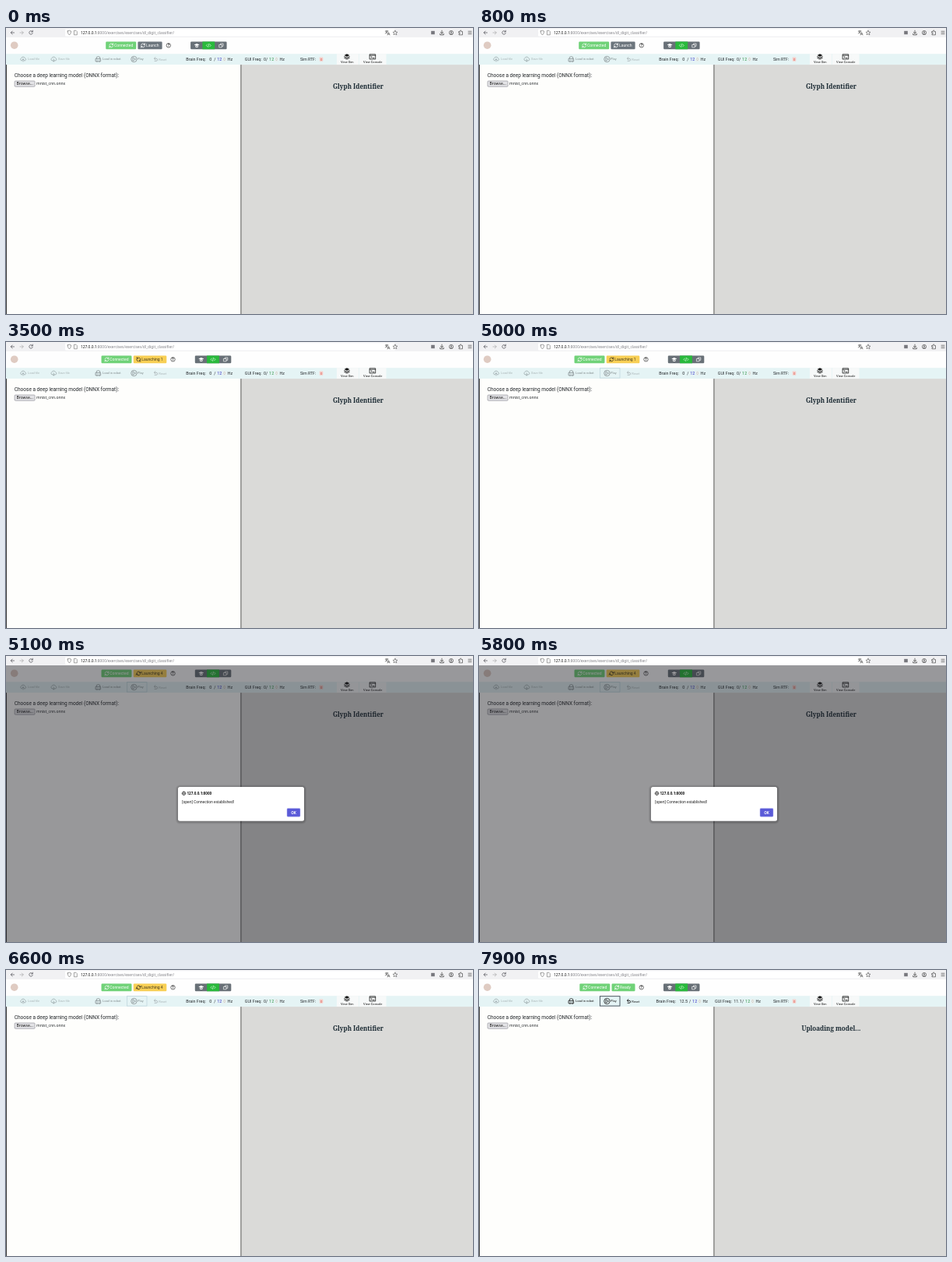
Animation, 600 px wide and 367 px high, one loop 8 s. Source, as an HTML page:

```html
<!DOCTYPE html>
<html lang="en">
<head>
<meta charset="utf-8">
<title>Exercise page</title>
<style>
  html, body { margin: 0; width: 100%; height: 100%; overflow: hidden; background: #fefefc; }
  svg { display: block; width: 100vw; height: 100vh; }
  text { font-family: Roboto, sans-serif; white-space: pre; }
  .ui { font-family: "Noto Sans", sans-serif; }
  .title { font: bold 8px "Noto Serif", serif; }
</style>
</head>
<body>
<svg id="stage" viewBox="0 0 600 367" xmlns="http://www.w3.org/2000/svg"></svg>
<script>
const LOOP = 8000;
const LAUNCH = 1000, ALERT = 5100, PRESS = 6400, CLOSE = 6600, READY = 6900, PLAY = 7200;
const INK = '#25292c', FAINT = '#a9b4b6', BLACK = '#111';
const stage = document.getElementById('stage');

function add(parent, tag, attrs = {}, content) {
  const node = document.createElementNS('http://www.w3.org/2000/svg', tag);
  set(node, attrs);
  if (content !== undefined) node.textContent = content;
  parent.appendChild(node);
  return node;
}
function set(node, attrs) {
  for (const key in attrs) node.setAttribute(key, attrs[key]);
}
const group = (parent, x = 0, y = 0) => add(parent, 'g', { transform: `translate(${x} ${y})` });
const rect = (parent, x, y, width, height, fill, more) =>
  add(parent, 'rect', { x, y, width, height, fill, ...more });
const text = (parent, x, y, size, content, fill = INK, more) =>
  add(parent, 'text', { x, y, 'font-size': size, fill, ...more }, content);
const line = (parent, d, stroke = '#4a4a50', width = 0.7, more) =>
  add(parent, 'path', { d, stroke, 'stroke-width': width, fill: 'none',
    'stroke-linecap': 'round', 'stroke-linejoin': 'round', ...more });
const circle = (parent, cx, cy, r, fill, more) => add(parent, 'circle', { cx, cy, r, fill, ...more });
const show = (node, on) => node.setAttribute('display', on ? 'inline' : 'none');
const move = (node, x, y = 0) => node.setAttribute('transform', `translate(${x} ${y})`);
const SYNC = 'M-2.4-.4A2.5 2.5 0 0 1 2-1.5M2.4-2.6V-1H.8M2.4.4A2.5 2.5 0 0 1-2 1.5M-2.4 2.6V1H-.8';

function drawBrowser() {
  rect(stage, 0, 0, 600, 12, '#f1f1f3');
  rect(stage, 76, 1.2, 424, 9.6, '#fff', { rx: 1.5 });
  line(stage, 'M10.5 6H6.3M8.2 4L6.2 6L8.2 8');
  line(stage, 'M18 6H22.2M20.3 4L22.3 6L20.3 8', '#aaa');
  line(stage, 'M34 4.6A2.3 2.3 0 1 0 34.3 6.6M34.3 3.2V5H32.5');
  line(stage, 'M79.2 4L81.4 3.2L83.6 4Q83.7 7.5 81.4 9Q79.1 7.5 79.2 4Z', '#666', 0.6);
  line(stage, 'M87.8 3.3H90L91.3 4.6V8.8H87.8Z', '#666', 0.6);
  const url = text(stage, 96, 7.8, 4.85, '', BLACK, { class: 'ui' });
  add(url, 'tspan', {}, '127.0.0.1');
  add(url, 'tspan', { fill: '#808086' }, ':8000/exercises/exercises/dl_digit_classifier/');
  line(stage, 'M487.3 4H491M489 3.2V4M490.3 4Q489.8 6.4 487.3 7M488 4.6Q489 6.5 490.3 6.8M490.2 9L491.6 5.6L493 9M490.7 8H492.5', '#444', 0.6);
  line(stage, 'M500 3.2L500.9 5.1L503 5.3L501.4 6.7L501.9 8.8L500 7.7L498.1 8.8L498.6 6.7L497 5.3L499.1 5.1Z', '#444', 0.55);
  rect(stage, 546.2, 3.8, 4.6, 4.4, '#77777d');
  line(stage, 'M560 3.2V7M558.3 5.4L560 7.1L561.7 5.4M557.7 7.4V8.8H562.3V7.4', '#333');
  circle(stage, 572, 6, 2.6, 'none', { stroke: '#333', 'stroke-width': 0.6 });
  circle(stage, 572, 5.3, 0.9, '#444');
  line(stage, 'M570.5 7.7Q572 6.2 573.5 7.7', '#444');
  line(stage, 'M582 4.6H583.3Q583 3 584.2 3Q585.3 3 585 4.6H586.5V8.8H582V7.3Q583.4 7.4 583.4 6.5Q583.3 5.8 582 6Z', '#333', 0.6);
  line(stage, 'M594 4.2H598M594 6H598M594 7.8H598', '#444', 0.6);
}

function drawHeader() {
  rect(stage, 0, 12, 600, 21.4, '#fefefe');
  circle(stage, 10.7, 22.2, 4.8, '#dfcbc2');

  const connected = group(stage);
  rect(connected, 0, 17.5, 39, 9.8, '#70d278', { rx: 1.2 });
  line(connected, SYNC, '#fff', 0.7, { transform: 'translate(7 22.4)' });
  text(connected, 10.8, 24.3, 5.05, 'Connected', '#fff');

  const status = group(stage);
  const box = rect(status, 0, 17.5, 31, 9.8, '#6c757d', { rx: 1.2 });
  const icon = line(status, SYNC, '#fff', 0.8);
  const label = text(status, 10.6, 24.3, 5.05, '');

  const help = group(stage);
  circle(help, 0, 22.3, 2.7, 'none', { stroke: '#333', 'stroke-width': 0.7 });
  text(help, 0, 24, 4.6, '?', '#222', { 'text-anchor': 'middle', 'font-weight': 'bold' });

  const tabs = group(stage);
  rect(tabs, 0, 17.5, 46.5, 9.8, '#687077', { rx: 1.2 });
  rect(tabs, 15.3, 17.5, 15.8, 9.8, '#29b93c');
  add(tabs, 'path', { d: 'M4.5 21.6L8 20L11.5 21.6L8 23.2ZM6 23V24.3Q8 25.5 10 24.3V23L8 23.9Z', fill: '#fff' });
  line(tabs, 'M21.7 20.9L20.2 22.4L21.7 23.9M24.7 20.9L26.2 22.4L24.7 23.9M23.7 20.5L22.7 24.3', '#e8ffe9', 0.65);
  line(tabs, 'M37 21.5H40.3V24.8H37ZM38.5 21.3V20H42V23.3H40.5', '#fff', 0.65);
  return { connected, status, box, icon, label, help, tabs };
}

function drawFrequency(name, color, valueX, targetX) {
  const root = group(stage);
  text(root, 0, 42, 5.4, name);
  const value = text(root, valueX, 42, 5.4, '0');
  const tail = group(root, targetX);
  const slash = text(tail, 0, 42, 5.4, '/');
  text(tail, 4, 42, 5.4, '12', color);
  rect(tail, 11.7, 37.4, 3.6, 5.2, '#eceeea');
  line(tail, 'M12.6 39.4L13.5 38.4L14.4 39.4M12.6 40.7L13.5 41.7L14.4 40.7', '#999', 0.4);
  text(tail, 17.4, 42, 5.4, 'Hz');
  return { root, value, tail, slash };
}

function cloud(x, arrow) {
  const g = group(stage, x, 40);
  line(g, 'M-1.4 1.8H-2.3A1.7 1.7 0 0 1-2.5-1.2A2.7 2.7 0 0 1 2.5-1.2A1.6 1.6 0 0 1 2.5 1.8H1.4', '#8d9a9c', 0.65);
  line(g, arrow, '#8d9a9c', 0.65);
}

function drawToolbar() {
  rect(stage, 0, 33.2, 600, 13.9, '#e5f4f5');
  cloud(22, 'M0 3V-.2M-1.2 1L0-.3L1.2 1');
  text(stage, 28, 41, 4, 'Load file', FAINT);
  cloud(61.3, 'M0-.2V3M-1.2 1.8L0 3.1L1.2 1.8');
  text(stage, 67, 41, 4, 'Save file', FAINT);

  const robot = group(stage);
  line(robot, 'M116.3 39.2V37.4L118.5 36.6L120.7 37.4V39.2M115.4 39.4H121.6V42.8H115.4ZM117 42.9V43.6M120 42.9V43.6', 'currentColor', 0.75);
  line(robot, 'M117 41H117.2M119.8 41H120', 'currentColor', 1);
  text(robot, 124, 41, 4, 'Load in robot', 'currentColor');

  const focus = rect(stage, 155.4, 33.7, 25.6, 12.4, 'none');
  const play = group(stage);
  circle(play, 164.4, 40, 3.7, 'none', { stroke: 'currentColor', 'stroke-width': 0.75 });
  line(play, 'M163.3 38L166.5 40L163.3 42Z', 'currentColor');
  text(play, 169, 41, 4, 'Play', 'currentColor');

  const reset = group(stage);
  line(reset, 'M190.5 39.2H193A1.5 1.5 0 0 1 193 42.3H191M191.9 37.7L190.3 39.2L191.9 40.7', 'currentColor', 0.85);
  text(reset, 196.2, 41.5, 4, 'Reset', 'currentColor');

  const brain = drawFrequency('Brain Freq:', '#3a35c8', 30, 36);
  const gui = drawFrequency('GUI Freq:', '#35964a', 24.3, 27.3);

  text(stage, 378, 42, 5.1, 'Sim RTF:');
  rect(stage, 402.7, 37.5, 4.6, 5.3, '#f5cfca', { rx: 0.8 });
  text(stage, 403.9, 41.7, 4.2, '0', '#d65a50');

  rect(stage, 425, 33.2, 28.2, 13.9, '#f7f9f9');
  rect(stage, 454, 33.2, 34.5, 13.9, '#f7f9f9');
  add(stage, 'path', { d: 'M438 33.3L441.4 35L438 36.7L434.6 35Z', fill: BLACK });
  line(stage, 'M434.8 36.7L438 38.3L441.2 36.7M434.8 38.4L438 40L441.2 38.4', BLACK, 0.9);
  text(stage, 438.3, 44.8, 4, 'View Sim', BLACK, { 'text-anchor': 'middle' });
  line(stage, 'M467.5 33.8H474.7V40H467.5ZM467.5 35.2H474.7M469 36.5L470.2 37.5L469 38.5M471.2 38.5H473', BLACK, 0.75);
  text(stage, 471.2, 44.8, 4, 'View Console', BLACK, { 'text-anchor': 'middle' });
  return { robot, focus, play, reset, brain, gui };
}

function drawPanes() {
  rect(stage, 0, 47.1, 302, 320, '#fefefc');
  rect(stage, 302, 47.1, 298, 320, '#dadad8');
  rect(stage, 0, 47.1, 1, 320, '#3b3b3b');
  rect(stage, 301.4, 47.1, 1, 320, '#555');
  text(stage, 10.8, 63.2, 6.5, 'Choose a deep learning model (ONNX format):', '#212529');
  rect(stage, 11.1, 68, 26, 7.2, '#e4e4e7', { rx: 1, stroke: '#85858d', 'stroke-width': 0.6 });
  text(stage, 24.1, 73.4, 5, 'Browse...', BLACK, { class: 'ui', 'text-anchor': 'middle', 'font-weight': 500 });
  text(stage, 39, 73.4, 5, 'mnist_cnn.onnx', INK, { class: 'ui' });
  return text(stage, 452.4, 78, 8, '', '#1b2a33', { class: 'title', 'text-anchor': 'middle' });
}

function drawAlert() {
  const root = group(stage);
  rect(root, 0, 12, 600, 355, '#1c1b22', { opacity: 0.45 });
  for (let i = 1; i < 4; i++) {
    rect(root, 221 - i, 168.5 - i, 162 + 2 * i, 44 + 2 * i, '#000', { rx: 2.5 + i, opacity: 0.07 });
  }
  rect(root, 221, 168, 162, 43.7, '#fff', { rx: 2.5 });
  circle(root, 228.5, 176.3, 2.3, 'none', { stroke: '#222', 'stroke-width': 0.6 });
  line(root, 'M226.2 176.3H230.8M228.5 174Q226.3 176.3 228.5 178.6Q230.7 176.3 228.5 174', '#222', 0.5);
  text(root, 232.4, 178, 4.65, '127.0.0.1:8000', BLACK, { class: 'ui', 'font-weight': 'bold' });
  text(root, 226, 189.4, 4.6, '[open] Connection established!', BLACK, { class: 'ui' });
  const button = rect(root, 361, 195.4, 17, 10.8, '#5a5ad8', { rx: 1.3, stroke: '#b5b5ee', 'stroke-width': 0.5 });
  text(root, 369.5, 202.5, 4.6, 'OK', '#fff', { class: 'ui', 'text-anchor': 'middle', 'font-weight': 'bold' });
  return { root, button };
}

drawBrowser();
const header = drawHeader();
const tools = drawToolbar();
const title = drawPanes();
const modal = drawAlert();

const IDLE = { x: 128.2, width: 31.2, fill: '#6c757d', ink: '#fff' };
const BUSY = { x: 122.5, width: 42.6, fill: '#f8cf55', ink: '#42391f' };
const DONE = { x: 129.3, width: 30, fill: '#70d278', ink: '#fff' };

function updateHeader(t) {
  const busy = t >= LAUNCH && t < READY;
  const look = t < LAUNCH ? IDLE : busy ? BUSY : DONE;
  const statusX = look.x + 41.2;
  const helpX = statusX + look.width + 8.2;
  move(header.connected, look.x);
  move(header.status, statusX);
  move(header.help, helpX);
  move(header.tabs, helpX + 28.3);
  set(header.box, { width: look.width, fill: look.fill });
  set(header.label, { fill: look.ink });
  header.label.textContent = busy ? `Launching ${t < ALERT ? 1 : 4}` : t < LAUNCH ? 'Launch' : 'Ready';

  // The spinner stands still while the alert blocks the page.
  const spinTime = t < ALERT ? t : t < CLOSE ? ALERT : t - CLOSE + ALERT;
  const angle = busy ? (spinTime - LAUNCH) * 0.18 : 0;
  set(header.icon, { stroke: look.ink, transform: `translate(6.6 22.4) rotate(${angle})` });
}

function updateFrequency(freq, x, running, value, shift, targetX) {
  move(freq.root, x);
  move(freq.tail, targetX + (running ? shift : 0));
  freq.value.textContent = running ? value : '0';
}

function update(t) {
  const ready = t >= READY, running = t >= PLAY;
  updateHeader(t);
  for (const tool of [tools.robot, tools.play, tools.reset]) {
    set(tool, { color: ready ? BLACK : tool === tools.reset ? FAINT : '#7f898b' });
  }
  set(tools.focus, {
    stroke: running ? '#3c4650' : '#b4cdd6',
    'stroke-width': running ? 0.9 : 0.6
  });
  show(tools.focus, t >= 4300);
  updateFrequency(tools.brain, running ? 227.4 : 231.2, running, '12.5', 6.7, 36);
  updateFrequency(tools.gui, running ? 303 : 306.8, running, '11.1', 7.8, 27.3);
  title.textContent = running ? 'Uploading model...' : 'Glyph Identifier';
  show(modal.root, t >= ALERT && t < CLOSE);
  set(modal.button, { fill: t < PRESS ? '#5a5ad8' : '#38389a' });
}

const start = performance.now();
function tick() {
  update((performance.now() - start) % LOOP);
  requestAnimationFrame(tick);
}
tick();
</script>
</body>
</html>
```
